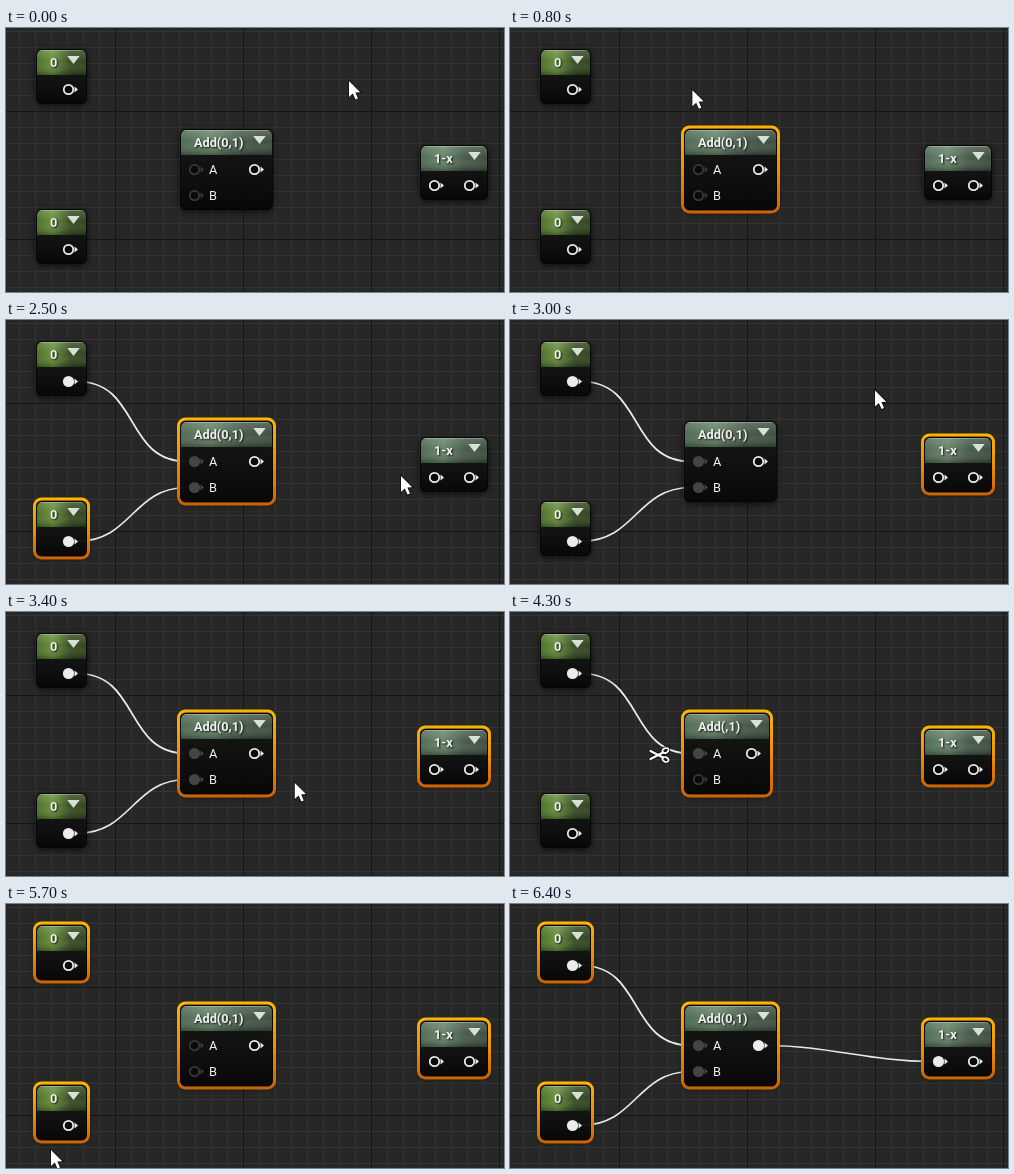
Animation, 498 px wide and 264 px high, one loop 6.8 s. Source, as an HTML page with a canvas:

```html
<!DOCTYPE html>
<html lang="en">
<head>
<meta charset="utf-8">
<title>Node graph wiring</title>
<style>
html, body { margin: 0; width: 100%; height: 100%; overflow: hidden; background: #272727; }
canvas { display: block; }
</style>
</head>
<body>
<canvas id="stage" width="498" height="264"></canvas>
<script>
const ctx = document.getElementById('stage').getContext('2d');
const LOOP = 6800, STEP = 100;
const GREEN = ['#45691f', '#648f38', '#33491f', '#2c4019'];
const SAGE = ['#4a654d', '#648267', '#435746', '#384a3b'];

const value = y => ({ x: 30, y, w: 51, h: 55, title: '0', textX: 14, colors: GREEN });
const nodes = {
  top: value(21),
  bottom: value(181),
  add: { x: 174, y: 101, w: 93, h: 81, title: 'Add(0,1)', textX: 14, colors: SAGE },
  minus: { x: 414, y: 117, w: 68, h: 55, title: '1-x', textX: 14, colors: SAGE }
};
const header = id => [nodes[id].x + nodes[id].w / 2, nodes[id].y + 13];
const outPin = ({ x, y, w }) => [x + w - 18.5, y + 40.5];
const inPin = ({ x, y }, row = 0) => [x + 14.5, y + 40.5 + 26 * row];

// Pointer gestures in steps of 100 ms; each begins where the last one ended
const gestures = [
  { from: 0, to: 6, via: [100, 30], end: header('add'), select: ['add'] },
  { from: 7, to: 12, via: [130, 18], end: header('top'), select: ['top', 'add'] },
  { from: 15, to: 18, via: [67, 109], end: header('bottom'), select: ['bottom'] },
  { from: 18, to: 21, via: [140, 150], end: header('add'), select: ['bottom', 'add'] },
  { from: 23, to: 27, via: [395, 156], end: header('minus'), select: ['minus'] },
  { from: 27, to: 32, via: [390, 70], end: header('add'), select: ['add', 'minus'] },
  { from: 32, to: 38, via: [299, 177], end: [234, 106] },
  { from: 40, to: 46, via: [149, 143], end: [175, 108] },
  { from: 47, to: 51, via: [450, 60], end: [434, 34], select: [] },
  { from: 52, to: 56, via: [198, 196], end: [45, 246], select: Object.keys(nodes) },
  { from: 57, to: 63, via: [250, 235], end: [470, 200] }
];
const HOME = [343, 53], MARQUEE = [434, 34], MARQUEE_LAG = .36;

const within = (k, from, to) => k >= from && k < to;

// Parabola through start, via and end
function pointerAt(k) {
  const i = gestures.findLastIndex(g => g.from <= k);
  const { from, to, via, end } = gestures[i];
  const start = i ? gestures[i - 1].end : HOME;
  const u = Math.min(1, (k - from) / (to - from));
  return start.map((s, n) => s + (end[n] - s) * u + (via[n] - (s + end[n]) / 2) * 4 * u * (1 - u));
}

function polygon(points, fill, stroke) {
  ctx.beginPath();
  points.forEach(([x, y]) => ctx.lineTo(x, y));
  ctx.closePath();
  if (stroke) { ctx.strokeStyle = stroke; ctx.lineWidth = 1.6; ctx.stroke(); }
  ctx.fillStyle = fill;
  ctx.fill();
}

function gradient(x0, y0, x1, y1, colors) {
  const g = ctx.createLinearGradient(x0, y0, x1, y1);
  colors.forEach((c, i) => g.addColorStop(i / (colors.length - 1), c));
  return g;
}

function roundRect(x, y, w, h, r) {
  ctx.beginPath();
  ctx.roundRect(x, y, w, h, r);
}

function gridLines(gap, x0, y0, color) {
  ctx.fillStyle = color;
  for (let x = x0; x < 498; x += gap) ctx.fillRect(x, 0, 1, 264);
  for (let y = y0; y < 264; y += gap) ctx.fillRect(0, y, 498, 1);
}

function wire([outX, y0], [inX, y1]) {
  const x0 = outX + 8.5, x1 = inX - 7.5;
  const h = (x1 - x0 + Math.abs(y1 - y0)) / 3;
  ctx.beginPath();
  ctx.moveTo(x0, y0);
  ctx.bezierCurveTo(x0 + h, y0, x1 - h, y1, x1, y1);
  ctx.strokeStyle = '#e8e8e8';
  ctx.lineWidth = 1.7;
  ctx.stroke();
}

function pin([x, y], linked, label) {
  const color = !label ? '#ececec' : linked ? '#454545' : '#393939';
  ctx.beginPath();
  ctx.arc(x, y, linked ? 5.6 : 4.7, 0, 7);
  ctx.fillStyle = linked ? color : '#0a0a0a';
  ctx.fill();
  if (!linked) { ctx.strokeStyle = color; ctx.lineWidth = 1.8; ctx.stroke(); }
  polygon([[x + 6, y - 3], [x + 9.5, y], [x + 6, y + 3]], color);
  if (label) {
    ctx.font = '12.8px Roboto, sans-serif';
    ctx.fillStyle = '#eeeeee';
    ctx.fillText(label, Math.round(x + 14), Math.round(y + 4));
  }
}

function node({ x, y, w, h, title, textX, colors }, selected) {
  ctx.save();
  ctx.shadowColor = 'rgba(0,0,0,.8)';
  ctx.shadowBlur = 7;
  ctx.shadowOffsetY = 1.5;
  roundRect(x, y, w, h, 6);
  ctx.fillStyle = gradient(0, y + 24, 0, y + h, ['rgba(20,22,20,.9)', 'rgba(7,7,7,.9)']);
  ctx.fill();
  ctx.restore();

  if (selected) {
    roundRect(x - 1.5, y - 2, w + 3, h + 4, 7);
    ctx.strokeStyle = gradient(0, y - 3, 0, y + h + 3, ['#ffb400', '#f09000', '#cc6200']);
    ctx.lineWidth = 3;
    ctx.stroke();
  }

  ctx.save();
  roundRect(x + 1, y + 1, w - 2, h - 2, 5);
  ctx.clip();
  ctx.fillStyle = gradient(x, 0, x + w, 0, colors);
  ctx.fillRect(x, y, w, 26);
  ctx.fillStyle = gradient(0, y, 0, y + 26, ['rgba(255,255,255,.2)', 'rgba(255,255,255,.03)', 'rgba(0,0,0,.3)']);
  ctx.fillRect(x, y, w, 26);
  ctx.fillStyle = 'rgba(255,255,255,.25)';
  ctx.fillRect(x, y + 1, w, 1);
  ctx.restore();
  roundRect(x + .5, y + .5, w - 1, h - 1, 5.5);
  ctx.strokeStyle = 'rgba(0,0,0,.6)';
  ctx.lineWidth = 1;
  ctx.stroke();

  ctx.save();
  ctx.shadowColor = 'rgba(0,0,0,.8)';
  ctx.shadowBlur = 2;
  ctx.shadowOffsetX = ctx.shadowOffsetY = 1;
  ctx.font = 'bold 12.7px Roboto, sans-serif';
  ctx.fillStyle = '#f0f0f0';
  ctx.fillText(title, x + textX, y + 18);
  ctx.restore();
  const tx = x + w - 13.5;
  polygon([[tx - 6.2, y + 7], [tx + 6.2, y + 7], [tx, y + 15]], '#d9e0d6');
}

function arrow(x, y) {
  const shape = [[0, 0], [0, 16], [3.8, 12.6], [6.5, 18.6], [9, 17.5], [6.4, 11.6], [11.2, 11.2]];
  polygon(shape.map(([px, py]) => [x + px, y + py]), '#ffffff', '#111111');
}

function scissors(x, y) {
  ctx.save();
  ctx.translate(x, y);
  ctx.lineCap = 'round';
  for (const [color, extra] of [['#111111', 1.6], ['#ffffff', 0]]) {
    ctx.strokeStyle = color;
    for (const side of [-1, 1]) {
      ctx.lineWidth = 2.2 + extra;
      ctx.beginPath();
      ctx.moveTo(-8.5, 4 * side);
      ctx.lineTo(4, -2.5 * side);
      ctx.stroke();
      ctx.lineWidth = 1.8 + extra;
      ctx.beginPath();
      ctx.ellipse(6.5, -4.5 * side, 3.2, 2.3, -.4 * side, 0, 7);
      ctx.stroke();
    }
  }
  ctx.restore();
}

function marquee([x, y]) {
  const [right, top] = MARQUEE;
  ctx.setLineDash([6, 3]);
  ctx.strokeStyle = '#f2f2f2';
  ctx.lineWidth = 1;
  ctx.strokeRect(Math.round(x) + .5, top + .5, right - Math.round(x) - 1, Math.round(y) - top - 1);
  ctx.setLineDash([]);
}

function draw(k) {
  const rewired = k >= 62;
  const topWire = rewired || within(k, 15, 44);
  const bottomWire = rewired || within(k, 23, 42);
  const outWire = rewired || within(k, 40, 41);
  const cutting = within(k, 41, 44);
  const add = cutting ? { ...nodes.add, w: 86, title: 'Add(,1)' } : nodes.add;
  const { top, bottom, minus } = nodes;
  const corner = within(k, 53, 57) && pointerAt(k - MARQUEE_LAG);
  const chosen = gestures.findLast(g => g.select && g.to <= k)?.select ?? [];
  const touched = ({ x, y, w, h }) =>
    x < MARQUEE[0] && x + w > corner[0] && y < corner[1] && y + h > MARQUEE[1];

  ctx.fillStyle = '#272727';
  ctx.fillRect(0, 0, 498, 264);
  gridLines(16, 13, 3, '#333333');
  gridLines(128, 109, 83, '#151515');

  if (topWire) wire(outPin(top), inPin(add));
  if (bottomWire) wire(outPin(bottom), inPin(add, 1));
  if (outWire) wire(outPin(add), inPin(minus));

  for (const [id, n] of Object.entries({ top, bottom, add, minus }))
    node(n, corner ? touched(n) : chosen.includes(id));
  pin(outPin(top), topWire);
  pin(outPin(bottom), bottomWire);
  pin(inPin(add), topWire, 'A');
  pin(inPin(add, 1), bottomWire, 'B');
  pin(outPin(add), outWire);
  pin(inPin(minus), outWire);
  pin(outPin(minus), false);

  if (corner) marquee(corner);
  if (k < 64) (within(k, 41, 48) ? scissors : arrow)(...pointerAt(k));
}

const start = performance.now();
function tick() {
  draw(Math.floor((performance.now() - start) % LOOP / STEP));
  requestAnimationFrame(tick);
}
tick();
</script>
</body>
</html>
```
